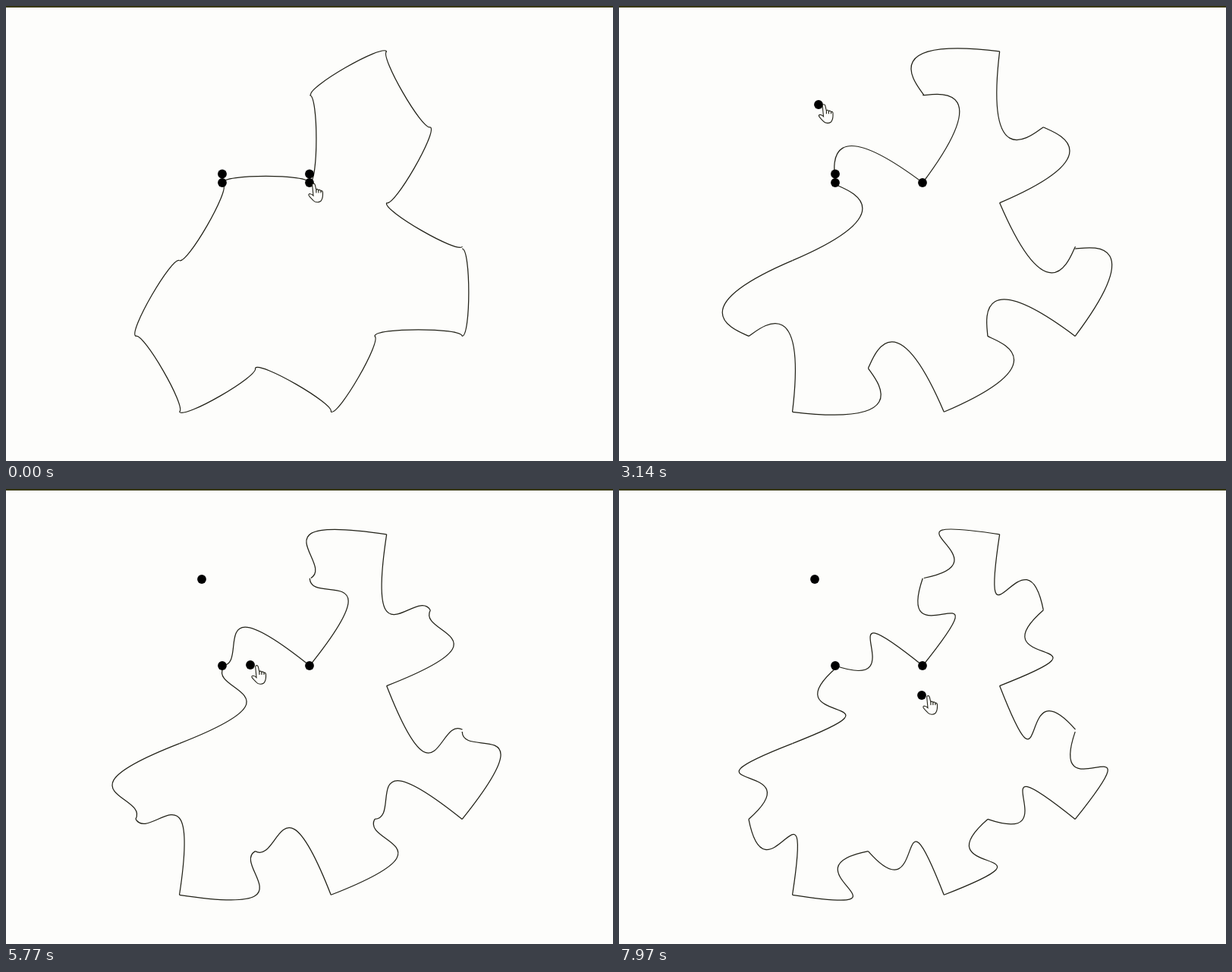
An HTML page with a canvas that plays this animation: 800x600 px, repeating every 8000 ms.

```html
<!DOCTYPE html>
<html>
<head>
<meta charset="utf-8">
<style>
html, body { margin: 0; height: 100%; overflow: hidden; background: #fdfdfb; }
canvas { display: block; }
</style>
</head>
<body>
<canvas id="stage" width="800" height="600"></canvas>
<script>
const ctx = document.getElementById('stage').getContext('2d');
const LOOP = 8000, SIDE = 115.3, PAPER = '#fdfdfb', INK = '#222218';

// Ends of the editable edge
const A = [285, 233], B = [400, 233];

// Outline of the tile: direction of each side in steps of 30 degrees
const headings = [0, -3, -1, 2, 4, 1, 3, 6, 4, 7, 5, 8, 10, 10];

// Dragged control points: time, x, y
const drag1 = [[4780, 285, 221.5], [5770, 322, 232], [6770, 363, 247], [7970, 399, 272]];
const drag2 = [[1150, 400, 221.5], [1430, 399, 217], [2200, 342, 170], [3140, 263, 130], [3800, 258, 119]];

const hand = new Path2D(
  'M-1.8 2C-1.8 -.5 1.2 -.5 1.8 1.8L3.4 8.6C4 7 6 7.4 6.4 9.2C7.4 7.8 9 8.4 9.5 10' +
  'C11 9 12 10.4 12 12C12.2 16 12 19 10.5 21.5C9 25.4 2 25.8 -.5 22.5' +
  'C-2.5 20 -5.5 18 -6.6 15.4C-7 13 -3.4 13 -.5 16Z');
const knuckles = new Path2D('M3.4 9V12.5M6.4 9.4V12.5M9.5 10V12.5');

const mix = ([x0, y0], [x1, y1], k) => [x0 + (x1 - x0) * k, y0 + (y1 - y0) * k];
const ramp = (t, from, to) => Math.min(1, Math.max(0, (t - from) / (to - from)));
const add = ([x, y], dx, dy) => [x + dx, y + dy];

function follow(keys, t) {
  return keys.reduce((pos, [end, x, y], i) =>
    i ? mix(pos, [x, y], ramp(t, keys[i - 1][0], end)) : [x, y], A);
}

function pointerAt(t, p, q) {
  const onQ = mix([405.5, 234], add(q, 7, -.3), ramp(t, 30, 330));
  return mix(onQ, add(p, 8.5, .5), ramp(t, 3870, 4370));
}

// The copies sit slightly apart from the editable edge
function shift(i) {
  return i < 2 ? [0, 0] : i < 6 ? [1.5, -.2] : [1.2, 2.7];
}

function drawEdge([x, y], angle, p, q) {
  ctx.save();
  ctx.translate(x, y);
  ctx.rotate(angle);
  ctx.beginPath();
  ctx.moveTo(0, 0);
  ctx.bezierCurveTo(p[0] - A[0], p[1] - A[1], q[0] - A[0], q[1] - A[1], SIDE, 0);
  ctx.stroke();
  ctx.restore();
}

function drawTile(p, q) {
  let from = A;
  headings.forEach((h, i) => {
    const angle = h * Math.PI / 6;
    const to = add(from, SIDE * Math.cos(angle), SIDE * Math.sin(angle));
    // every second side runs backwards
    const back = i % 2;
    drawEdge(add(back ? to : from, ...shift(i)), angle + back * Math.PI, p, q);
    from = to;
  });
}

function drawDot([x, y]) {
  ctx.beginPath();
  ctx.arc(x, y, 5.9, 0, 2 * Math.PI);
  ctx.fill();
}

function drawHand([x, y]) {
  ctx.save();
  ctx.translate(x, y);
  ctx.fillStyle = PAPER;
  ctx.fill(hand);
  ctx.lineWidth = 1.1;
  ctx.stroke(hand);
  ctx.stroke(knuckles);
  ctx.restore();
}

function draw(t) {
  const p = follow(drag1, t), q = follow(drag2, t);
  ctx.fillStyle = PAPER;
  ctx.fillRect(0, 0, 800, 600);
  ctx.fillStyle = '#3a3a14';
  ctx.fillRect(0, 0, 800, 2);
  ctx.strokeStyle = INK;
  ctx.lineWidth = 1.25;
  drawTile(p, q);
  ctx.fillStyle = '#000';
  [A, B, p, q].forEach(drawDot);
  drawHand(pointerAt(t, p, q));
}

const start = performance.now();
function frame() {
  draw((performance.now() - start) % LOOP);
  requestAnimationFrame(frame);
}
frame();
</script>
</body>
</html>
```
